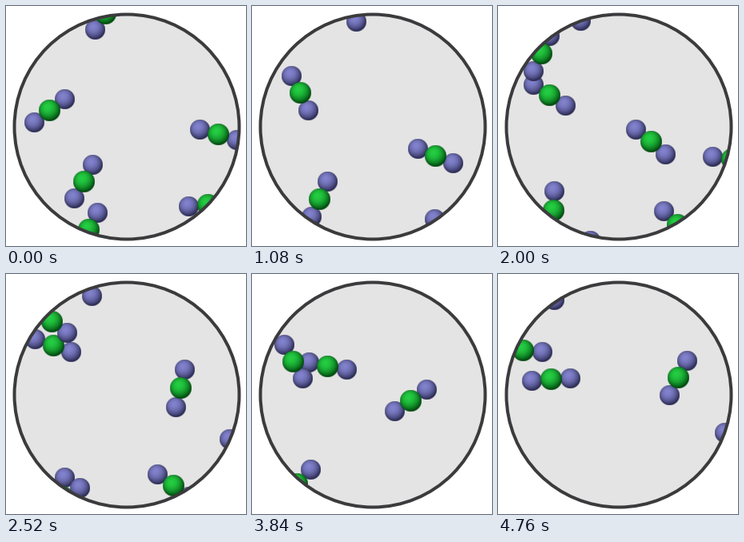
Write a matplotlib script that moves like this. It is 300 px wide and 300 px high and loops after 4.8 s.

```python
import numpy as np
import matplotlib.pyplot as plt
from matplotlib.animation import FuncAnimation
from matplotlib.patches import Circle

SIZE, DPI = 300, 100
FRAMES, STEP = 120, 40
CENTER, RADIUS = np.array([151, 151]), 140.5
BOND = 24
LEAVE_MS, LEAVE_PX = 600, 55

# Moments (ms) at which poses are fixed
TIMES = [0, 1080, 2000, 2520, 3360, 4360, 4760]

# First moment, then x, y of the middle atom and the bond angle in degrees
PATHS = [
    (0, (252, 249, 175), (240, 288, 240), (224, 274, 227), (209, 265, 216)),
    (0, (97, 220, -61), (84, 242, -66), (69, 256, -88), (70, 279, -83),
     (62, 281, -75)),
    (0, (103, 280, -62)),
    (2, (112, 317, -82), (81, 289, -62), (63, 277, -55), (43, 259, -38)),
    (0, (124, 10, 123), (132, -4, 95), (95, -4, 70), (99, 5, 71)),
    (6, (56, 13, 55)),
    (2, (292, 192, 188), (302, 215, 200)),
    (6, (306, 206, 197)),
    (0, (265, 161, 16), (229, 188, 22), (191, 170, 40), (218, 143, 103),
     (190, 150, 165), (215, 155, 117), (225, 130, 117)),
    (0, (54, 131, -37), (60, 109, -116), (64, 112, -147), (59, 90, -161),
     (82, 111, -144), (92, 121, -195), (66, 132, -184)),
    (2, (54, 60, 114), (57, 60, 35), (44, 116, 58), (52, 94, 44), (31, 96, 5)),
]


def outside(pose):
    """The same pose pushed away from the middle of the window."""
    ray = np.array(pose[:2]) - CENTER
    return (*(pose[:2] + ray / np.hypot(*ray) * LEAVE_PX), pose[2])


def make_path(first, *poses):
    """Times, poses and slopes, with an entry and exit where needed."""
    times, poses = TIMES[first:first + len(poses)], list(poses)
    if times[-1] < TIMES[-1]:
        times, poses = times + [times[-1] + LEAVE_MS], poses + [outside(poses[-1])]
    if first > 0:
        times, poses = [times[0] - LEAVE_MS] + times, [outside(poses[0])] + poses
    times, poses = np.array(times, float), np.array(poses, float)
    return times, poses, np.gradient(poses, times, axis=0)


def pose_at(path, t):
    """Smooth pose at time t (cubic Hermite)."""
    times, poses, slopes = path
    t = np.clip(t, times[0], times[-1])
    i = min(np.searchsorted(times, t, side="right") - 1, len(times) - 2)
    span = times[i + 1] - times[i]
    u = (t - times[i]) / span
    return ((1 + 2 * u) * (1 - u) ** 2 * poses[i]
            + u * (1 - u) ** 2 * span * slopes[i]
            + u * u * (3 - 2 * u) * poses[i + 1]
            + u * u * (u - 1) * span * slopes[i + 1])


def sphere(dark, light, n=96):
    """RGBA picture of a ball lit from the upper left."""
    axis = (np.arange(n) + 0.5) / n * 2 - 1
    x, y = np.meshgrid(axis, axis)
    r = np.hypot(x, y)
    z = np.sqrt(np.clip(1 - r ** 2, 0, 1))
    lit = np.clip(-0.2 * x - 0.33 * y + 0.92 * z, 0, 1)[..., None] ** 1.3
    rgb = (np.array(dark) * (1 - lit) + np.array(light) * lit) / 255
    alpha = np.clip((1 - r) * n / 8 + 0.5, 0, 1)
    return np.dstack([rgb, alpha])


GREEN = sphere((0, 72, 14), (36, 206, 66)), 13.2
PURPLE = sphere((42, 42, 82), (130, 130, 206)), 12.2

fig = plt.figure(figsize=(SIZE / DPI, SIZE / DPI), dpi=DPI, facecolor="white")
ax = fig.add_axes([0, 0, 1, 1])
ax.axis("off")

disc = ax.add_patch(Circle(CENTER, RADIUS, fc="#e4e4e4", ec="none", zorder=0))
ax.add_patch(Circle(CENTER, RADIUS, fc="none", ec="#3b3b3d",
                    lw=4 * 72 / DPI, zorder=5))


def add_atom(kind):
    picture, radius = kind
    image = ax.imshow(picture, extent=(0, 1, 1, 0), aspect="auto", zorder=2)
    image.set_clip_path(disc)
    return image, radius


# Each molecule: two outer atoms, then the middle one on top
molecules = [(make_path(*path),
              [(*add_atom(kind), side)
               for kind, side in ((PURPLE, 1), (PURPLE, -1), (GREEN, 0))])
             for path in PATHS]
ax.set_xlim(0, SIZE)
ax.set_ylim(SIZE, 0)


def update(frame):
    for path, atoms in molecules:
        x, y, angle = pose_at(path, frame * STEP)
        turn = np.radians(angle)
        for image, r, side in atoms:
            cx = x + side * BOND * np.cos(turn)
            cy = y + side * BOND * np.sin(turn)
            gap = np.hypot(cx - CENTER[0], cy - CENTER[1]) - r
            image.set_visible(bool(gap < RADIUS))
            image.set_extent((cx - r, cx + r, cy + r, cy - r))
    return [image for _, atoms in molecules for image, _, _ in atoms]


anim = FuncAnimation(fig, update, frames=FRAMES, interval=STEP,
                     repeat=True, repeat_delay=0)
plt.show()
```
